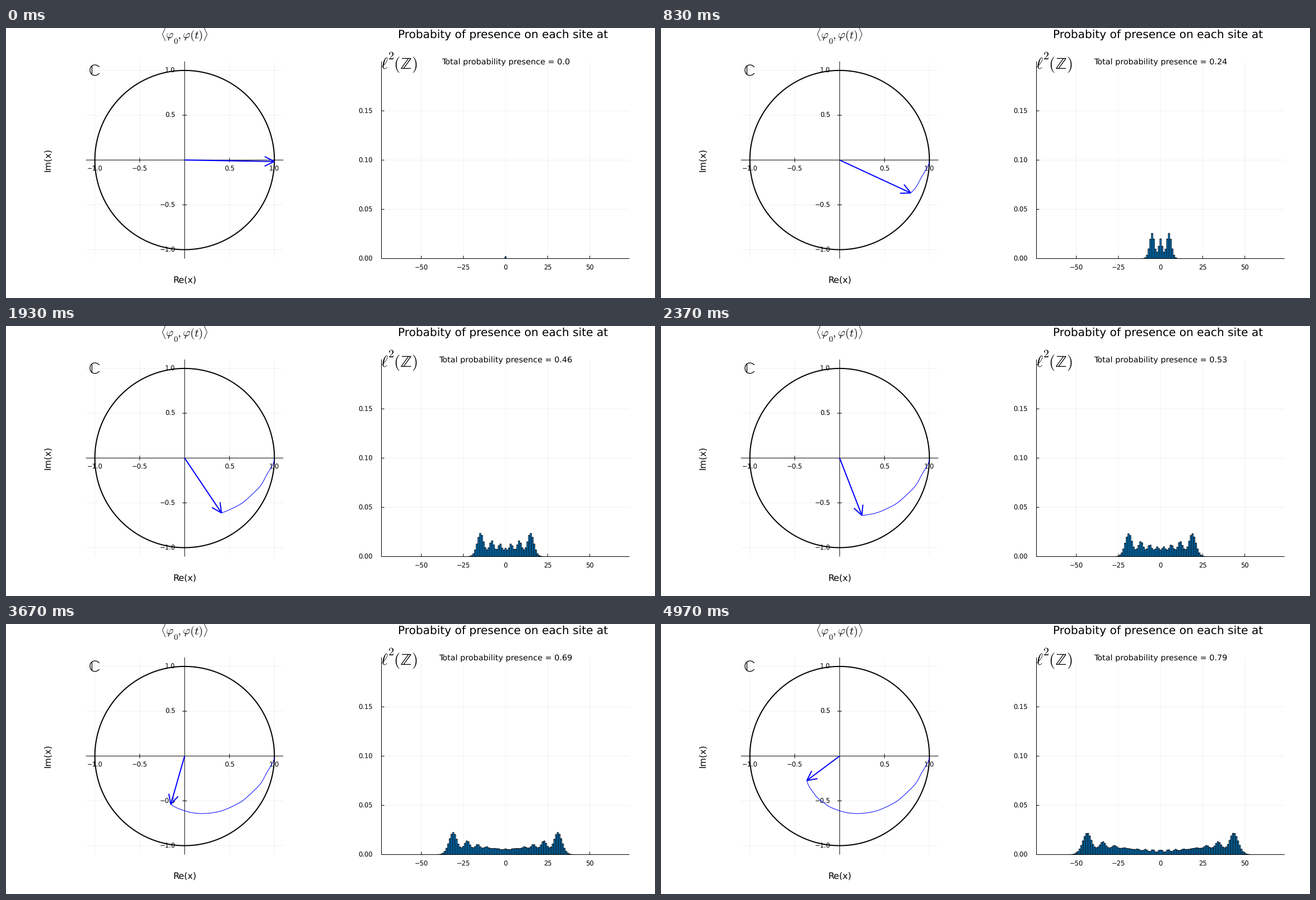
A matplotlib script for the animation above (5010 ms loop, 1159 by 483 pixels).

```python
import numpy as np
import matplotlib.pyplot as plt
from matplotlib.animation import FuncAnimation
from matplotlib.collections import PolyCollection

WIDTH, HEIGHT, DPI = 1159, 483, 64
TICK_MS, TICKS = 30, 167     # one loop is 5010 ms
STATES, RATE = 150, 0.03     # simulated states, shown at 30 per second
PT = 72 / DPI                # points per pixel
FONT = 1.44                  # pixels per nominal font point

# Discrete level coupled to site 0 of a tight-binding chain
SITES = np.arange(-65, 66)
ENERGY, COUPLING, HOPPING, DT = 0.1, 0.25, 1.0, 1 / 6

plt.rcParams.update({
    "font.family": "DejaVu Sans",
    "mathtext.fontset": "cm",
    "text.hinting": "none",
    "path.simplify": False,
    "path.snap": False,
})


def evolve():
    """Return the level amplitude and the site probabilities for every state."""
    size = len(SITES)
    ham = np.zeros((size + 1, size + 1))
    ham[0, 0] = ENERGY
    centre = 1 + size // 2
    ham[0, centre] = ham[centre, 0] = COUPLING
    for i in range(1, size):
        ham[i, i + 1] = ham[i + 1, i] = HOPPING
    values, vectors = np.linalg.eigh(ham)
    times = DT * np.arange(1, STATES + 1)
    phases = np.exp(-1j * np.outer(times, values))
    states = (phases * vectors[0]) @ vectors.T
    return states[:, 0], np.abs(states[:, 1:]) ** 2


amplitude, probability = evolve()

fig = plt.figure(figsize=(WIDTH / DPI, HEIGHT / DPI), dpi=DPI, facecolor="white")
ax = fig.add_axes([0, 0, 1, 1])
ax.set(xlim=(0, WIDTH), ylim=(HEIGHT, 0))
ax.axis("off")


def line(xs, ys, width=1, color="black", **kw):
    kw.setdefault("solid_capstyle", "butt")
    return ax.plot(xs, ys, color=color, lw=width * PT, **kw)[0]


def grid(xs, ys):
    line(xs, ys, alpha=0.06, zorder=1)


def label(x, y, text, size, ha="center", **kw):
    return ax.text(x, y, text, fontsize=size * FONT * PT, ha=ha,
                   va="baseline", zorder=3, **kw)


def number(value, digits):
    return f"{value:.{digits}f}".replace("-", "\u2212")


# Complex plane
CX, CY, RADIUS = 319.0, 236.2, 160.3
LEFT, RIGHT, TOP, BOTTOM = 142.7, 495.3, 59.9, 412.5


def to_plane(z):
    return CX + RADIUS * np.real(z), CY - RADIUS * np.imag(z)


def draw_plane():
    for v in (-1, -0.5, 0.5, 1):
        x, y = CX + RADIUS * v, CY - RADIUS * v
        grid([x, x], [TOP, BOTTOM])
        grid([LEFT, RIGHT], [y, y])
        line([x, x], [CY - 4, CY + 4])
        line([CX - 4, CX + 4], [y, y])
        label(x, 256, number(v, 1), 8)
        label(302.5, y + 4.2, number(v, 1), 8, ha="right")
    line([LEFT, RIGHT], [CY, CY])
    line([CX, CX], [TOP, BOTTOM])
    line(*to_plane(np.exp(1j * np.linspace(0, 2 * np.pi, 361))), width=2, zorder=4)
    label(CX, 456, "Re(x)", 11)
    label(79, CY, "Im(x)", 11, rotation=90, rotation_mode="anchor")
    label(157.5, 85.5, r"$\mathrm{\mathbb{C}}$", 20)
    label(276, 19, r"$\langle\varphi$", 14, ha="left")
    label(299, 27.5, "$0$", 10, ha="left")
    label(306.5, 19, r"$,\varphi(t)\rangle$", 14, ha="left")


# Site probabilities
X0, X_UNIT, Y_UNIT = 892.1, 3.01, 1762
AXIS_LEFT, AXIS_RIGHT = 670.5, 1113.5


def draw_sites():
    for n in (-50, -25, 0, 25, 50):
        x = X0 + X_UNIT * n
        grid([x, x], [TOP, BOTTOM])
        line([x, x], [BOTTOM, BOTTOM - 5])
        label(x, 432.5, number(n, 0), 8)
    for p in (0, 0.05, 0.1, 0.15):
        y = BOTTOM - Y_UNIT * p
        grid([AXIS_LEFT, AXIS_RIGHT], [y, y])
        line([AXIS_LEFT, AXIS_LEFT + 5], [y, y])
        label(654.5, y + 4.2, number(p, 2), 8, ha="right")
    line([AXIS_LEFT, AXIS_RIGHT], [BOTTOM, BOTTOM])
    line([AXIS_LEFT, AXIS_LEFT], [TOP, BOTTOM])
    label(888, 17.8, "Probabity of presence on each site at", 14)
    label(669, 72.5, r"$\ell$", 20, ha="left")
    label(682, 56.5, "$2$", 14, ha="left")
    label(692, 72.5, r"$(\mathrm{\mathbb{Z}})$", 20, ha="left")


draw_plane()
draw_sites()

trail = line([], [], color="blue", zorder=5)
shaft = line([], [], width=2, color="blue", zorder=6)
head = line([], [], width=2, color="blue", zorder=6, solid_joinstyle="miter")
bars = PolyCollection([], facecolor="#009AFA", edgecolor="black",
                      linewidth=PT, zorder=4)
ax.add_collection(bars, autolim=False)
total = label(892.5, 65.3, "", 10)

BAR_LEFT = X0 + X_UNIT * (SITES - 0.4)
BAR_RIGHT = X0 + X_UNIT * (SITES + 0.4)
HEAD_LENGTH, HEAD_ANGLE = 19.3 / RADIUS, np.arctan(0.5)


def state_at(tick):
    """Pick the state nearest to the end of the tick."""
    return min(int((TICK_MS * tick + 25) * RATE), STATES - 1)


def update(tick):
    state = state_at(tick)
    tip = amplitude[state]
    back = -HEAD_LENGTH * tip / abs(tip)
    wings = tip + back * np.exp(1j * HEAD_ANGLE * np.array([-1, 1]))
    trail.set_data(*to_plane(amplitude[:state + 1]))
    shaft.set_data(*to_plane(np.array([0, tip])))
    head.set_data(*to_plane(np.array([wings[0], tip, wings[1]])))

    tops = BOTTOM - Y_UNIT * probability[state]
    bars.set_verts([[(l, BOTTOM), (l, t), (r, t), (r, BOTTOM)]
                    for l, r, t in zip(BAR_LEFT, BAR_RIGHT, tops)])
    presence = round(float(probability[state].sum()), 2)
    total.set_text(f"Total probability presence = {presence}")
    return trail, shaft, head, bars, total


anim = FuncAnimation(fig, update, frames=TICKS, interval=TICK_MS,
                     repeat=True, repeat_delay=0, blit=False)
plt.show()
```
